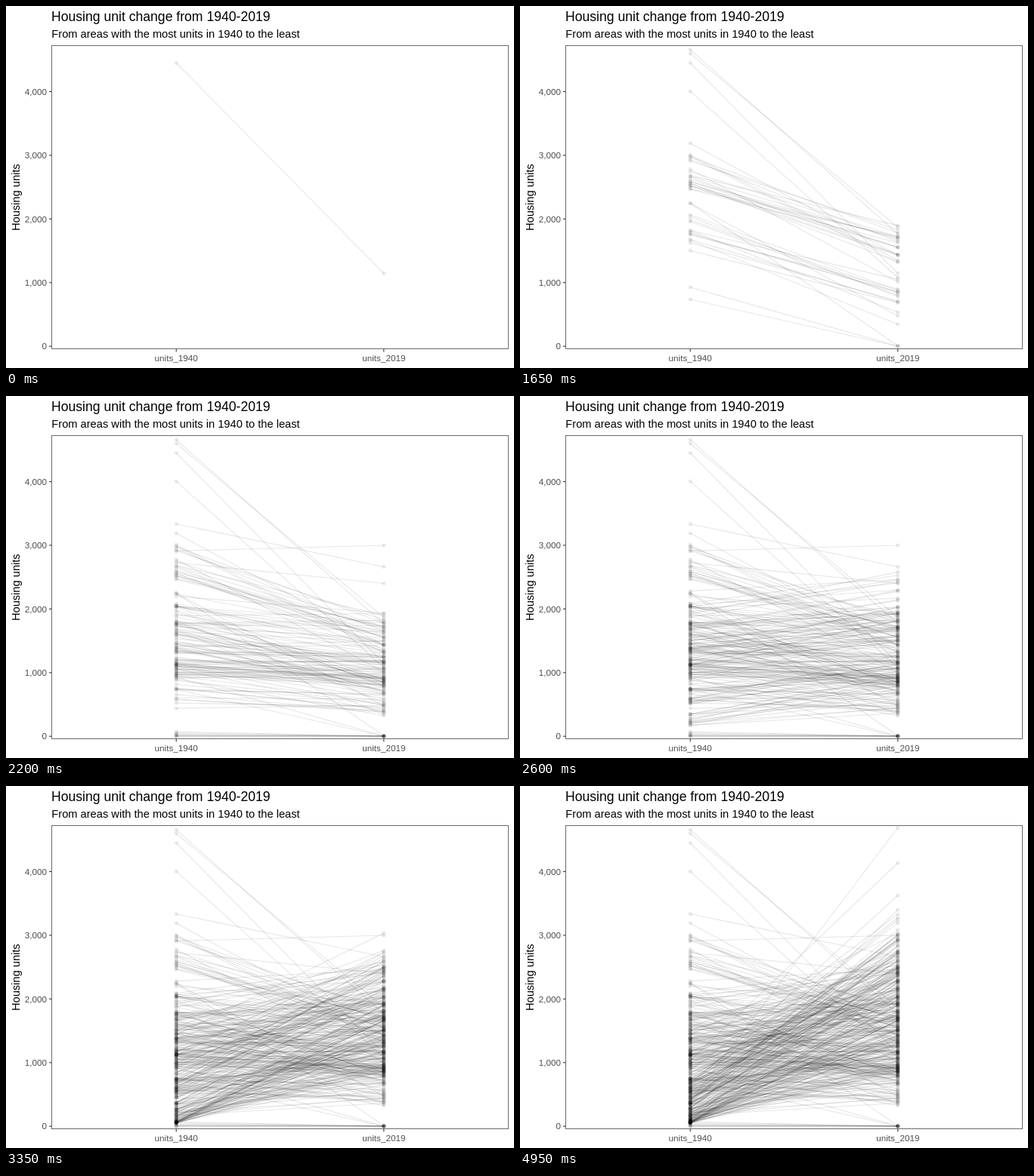
Recreate the animation shown at these times as an HTML page. Size 672 by 480 pixels, loop 5 s.

```html
<!DOCTYPE html>
<html lang="en">
<head>
<meta charset="utf-8">
<title>Housing unit change</title>
<style>
  html, body { margin: 0; width: 672px; height: 480px; overflow: hidden; background: #fff; }
  svg { display: block; font-family: "Liberation Sans", Arial, sans-serif; }
  .axis { font-size: 11.73px; fill: #4d4d4d; }
  .tick { stroke: #333; stroke-width: 1.07; }
  .frame { fill: none; stroke: #6b6b6b; stroke-width: 1; }
  .line { stroke: #000; stroke-width: 1.07; stroke-opacity: .1; }
  .dot { fill: #000; fill-opacity: .07; stroke: #000; stroke-width: .9; stroke-opacity: .05; }
</style>
</head>
<body>
<svg width="672" height="480" viewBox="0 0 672 480">
  <text x="60" y="20" font-size="17.6">Housing unit change from 1940-2019</text>
  <text x="60.3" y="42" font-size="14.67">From areas with the most units in 1940 to the least</text>
  <text transform="translate(18 253.7) rotate(-90)" font-size="14.67" text-anchor="middle">Housing units</text>
  <g id="data"></g>
  <rect class="frame" x="60.5" y="52.5" width="604" height="402"/>
  <g id="axes"></g>
</svg>
<script>
const LOOP = 5000, TICK = 50;
const LEFT = 225.2, RIGHT = 499.8, ZERO = 451.2, PER_UNIT = 0.08442;
const FIRST_RISE = -279, RISE_PER_TICK = 6.475;

const data = document.getElementById("data");
const axes = document.getElementById("axes");

function add(parent, tag, attrs, text) {
  const el = document.createElementNS("http://www.w3.org/2000/svg", tag);
  for (const key in attrs) el.setAttribute(key, attrs[key]);
  if (text) el.textContent = text;
  parent.appendChild(el);
  return el;
}

// Axis ticks and labels
for (let v = 0; v <= 4000; v += 1000) {
  const y = ZERO - v * PER_UNIT;
  add(axes, "path", { class: "tick", d: `M57 ${y}H60.5` });
  add(axes, "text", { class: "axis", x: 54, y: y + 4.2, "text-anchor": "end" }, v.toLocaleString("en-US"));
}
[[LEFT, "units_1940"], [RIGHT, "units_2019"]].forEach(([x, label]) => {
  add(axes, "path", { class: "tick", d: `M${x} 454.8V458.5` });
  add(axes, "text", { class: "axis", x, y: 471, "text-anchor": "middle" }, label);
});

// Slopes that stand apart, as [left y, right y]
const slopes = [
  [75.5, 354.5], [58, 302], [63, 293.5], [113.2, 360], [261.5, 450.5],
  [182, 330.5], [216.5, 366], [261.5, 411], [373, 451], [389, 451.2],
  [169.7, 226.5], [205.5, 198], [221, 248.5], [330, 195],
  [377, 170], [397, 145], [364, 102], [432.5, 164], [418, 55.5]
];

let seed = 1940;
function rand() {
  seed = (seed * 1664525 + 1013904223) % 4294967296;
  return seed / 4294967296;
}

// n slopes with rises spread over lo..hi, left ends between top and bottom;
// a higher bias gathers the left ends near the bottom
function spread(n, lo, hi, top, bottom, bias, endTop, endBottom) {
  for (let i = 0; i < n; i++) {
    const rise = lo + (hi - lo) * (i + rand()) / n;
    let a, b;
    do {
      a = bottom - (bottom - top) * rand() ** bias;
      b = a - rise;
    } while (b < endTop || b > endBottom);
    slopes.push([a, b]);
  }
}
spread(2, -145, -136, 192, 202, 1, 330, 345);
spread(30, -112, -62, 200, 335, 1, 290, 424);
spread(70, -61, 8, 250, 415, 1, 285, 425);
spread(25, -25, 8, 340, 372, 1, 285, 425);
spread(90, 9, 60, 245, 437, 1.2, 232, 425);
spread(145, 61, 170, 310, 447, 2, 215, 400);
spread(42, 172, 228, 370, 443, 2, 172, 280);
for (let i = 0; i < 8; i++) slopes.push([ZERO - 6 * (i / 7) ** 2, ZERO - 0.6 * rand()]);

// The steepest fall comes first, then each slope in order of its rise
const marks = slopes.map(([a, b]) => {
  const el = add(data, "g", { visibility: "hidden" });
  add(el, "line", { class: "line", x1: LEFT, y1: a, x2: RIGHT, y2: b });
  add(el, "circle", { class: "dot", cx: LEFT, cy: a, r: 2.3 });
  add(el, "circle", { class: "dot", cx: RIGHT, cy: b, r: 2.3 });
  return { el, tick: Math.round((a - b - FIRST_RISE) / RISE_PER_TICK) };
});

let shown = -1;
function draw(ms) {
  const tick = Math.floor((ms % LOOP) / TICK);
  if (tick === shown) return;
  shown = tick;
  for (const m of marks) m.el.setAttribute("visibility", m.tick <= tick ? "visible" : "hidden");
}

function loop() {
  draw(performance.now());
  requestAnimationFrame(loop);
}
loop();
</script>
</body>
</html>
```
